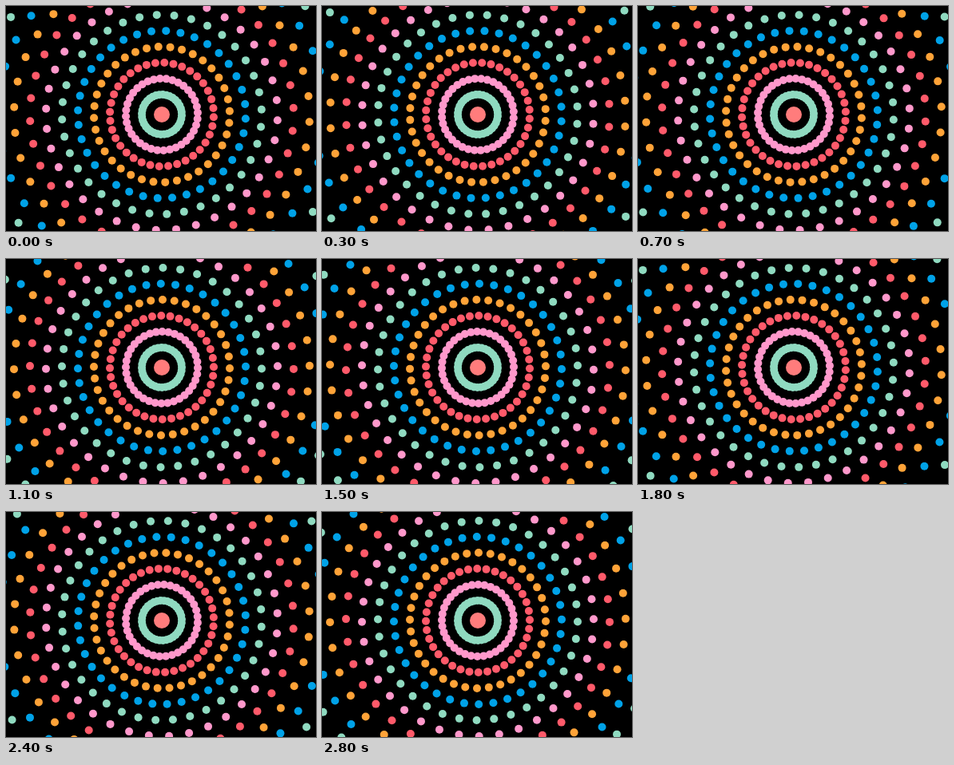
Write an HTML page with a canvas that moves like this. It is 388x282 px and loops after 2900 ms.

```html
<!DOCTYPE html>
<html lang="en">
<head>
<meta charset="utf-8">
<title>Counter-rotating dot rings</title>
<style>
  html, body { margin: 0; width: 100%; height: 100%; overflow: hidden; background: #000; }
  canvas { display: block; }
</style>
</head>
<body>
<canvas id="stage" width="388" height="282"></canvas>
<script>
const ctx = document.getElementById('stage').getContext('2d');
const CENTER = { x: 195, y: 136 };
const COLORS = ['#8fdac0', '#ff98cb', '#ff5a6a', '#ffa338', '#00a2e8'];
const RINGS = 11, DOTS = 36, DOT_RADIUS = 5;
const LOOP = 2900, TICK = 100;
const RAD = Math.PI / 180;
const START_ANGLE = 2.87, STEP_ANGLE = 10 / 17;

function dot(x, y, radius, color) {
  ctx.fillStyle = color;
  ctx.beginPath();
  ctx.arc(x, y, radius, 0, 2 * Math.PI);
  ctx.fill();
}

// The rotation advances once per tick, with a short hold mid-loop and a longer one near the end.
function stepAt(time) {
  const tick = Math.floor((time % LOOP) / TICK);
  if (tick < 12) return tick;
  return tick < 28 ? Math.min(tick - 1, 24) : 28;
}

function draw(time) {
  const turn = START_ANGLE + stepAt(time) * STEP_ANGLE;
  ctx.fillStyle = '#000';
  ctx.fillRect(0, 0, 388, 282);
  dot(CENTER.x, CENTER.y, 10, '#ff7c7c');

  for (let ring = 0; ring < RINGS; ring++) {
    const radius = 25 + 20 * ring;
    const direction = ring % 2 ? -1 : 1;
    for (let i = 0; i < DOTS; i++) {
      const angle = (i * 360 / DOTS + direction * turn) * RAD;
      dot(CENTER.x + radius * Math.cos(angle), CENTER.y + radius * Math.sin(angle),
          DOT_RADIUS, COLORS[ring % COLORS.length]);
    }
  }
}

const start = performance.now();
function frame() {
  draw(performance.now() - start);
  requestAnimationFrame(frame);
}
frame();
</script>
</body>
</html>
```
